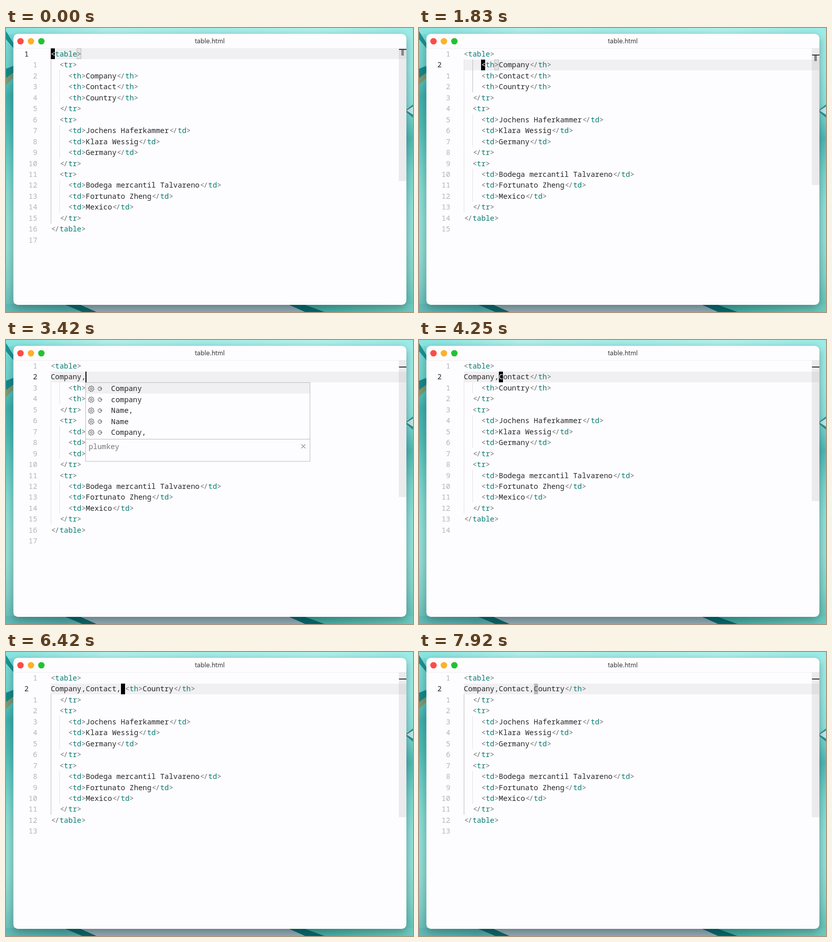
Recreate the animation shown at these times as an HTML page with a canvas. Size 800 px wide and 557 px high, loop 8000 ms.

```html
<!DOCTYPE html>
<html lang="en">
<head>
<meta charset="utf-8">
<title>table.html</title>
<style>
  html, body { margin: 0; width: 100%; height: 100%; overflow: hidden; }
  canvas { display: block; width: 800px; height: 557px; }
</style>
</head>
<body>
<canvas id="stage" width="800" height="557"></canvas>
<script>
const g = document.getElementById('stage').getContext('2d');
const LOOP = 8000, LEFT = 88, TOP = 40, CELL = 8.6, ROW = 21.48, RIGHT = 787;
const CODE = '500 14.33px "Noto Sans Mono", monospace';
const TEXT = '#262628', MARK = '#6c6e71', TAG = '#067d74', PAPER = '#fdfcfe';

const cell = (tag, text) => `    <${tag}>${text}</${tag}>`;
const record = (...values) => ['  <tr>', ...values.map(v => cell('td', v)), '  </tr>'];
const heads = ['Company', 'Contact', 'Country'].map(v => cell('th', v));
const body = [
  '  </tr>',
  ...record('Jochens Haferkammer', 'Klara Wessig', 'Germany'),
  ...record('Bodega mercantil Talvareno', 'Fortunato Zheng', 'Mexico'),
  '</table>', ''
];

// Each step: start time, lines between <table> and the rest, cursor row and column, extras
const step = (at, head, row, col, extra = {}) =>
  ({ at, lines: ['<table>', ...head, ...body], row, col, ...extra });
const [, contact, country] = heads;
const two = [contact, country];
const steps = [
  step(0, ['  <tr>', ...heads], 0, 0, { guide: 0 }),
  step(650, ['  <tr>', ...heads], 1, 0, { guide: 2 }),
  step(1400, heads, 1, 4, { guide: 2 }),
  step(2000, ['<th>Company</th>', ...two], 1, 0),
  step(2280, ['Company</th>', ...two], 1, 0),
  step(2620, ['Company</th>', ...two], 1, 7),
  step(2880, ['Company', ...two], 1, 7, { insert: true }),
  step(3080, ['Company,', ...two], 1, 8, { insert: true,
    hints: [' Company', ' company', ' Name,', ' Name', ' Company,'] }),
  step(3560, ['Company,', ...two], 1, 7),
  step(3720, ['Company, <th>Contact</th>', country], 1, 8),
  step(4020, ['Company,Contact</th>', country], 1, 8),
  step(4500, ['Company,Contact</th>', country], 1, 15),
  step(4900, ['Company,Contact', country], 1, 15, { insert: true }),
  step(5120, ['Company,Contact,', country], 1, 16, { insert: true,
    hints: ['Company', 'Contact', 'Address', 'Address,', 'Organ'] }),
  step(5780, ['Company,Contact,', country], 1, 15),
  step(6000, ['Company,Contact, <th>Country</th>'], 1, 16, { guide: 0 }),
  step(6660, ['Company,Contact,Country</th>'], 1, 16, { guide: 0 })
];

const colX = c => LEFT + c * CELL;
const rowY = r => TOP + r * ROW;
const indent = s => s.search(/\S|$/);

function rect(x, y, w, h, color) {
  g.fillStyle = color;
  g.fillRect(x, y, w, h);
}
function poly(color, ...p) {
  g.fillStyle = color;
  g.beginPath();
  for (let i = 0; i < p.length; i += 2) g.lineTo(p[i], p[i + 1]);
  g.fill();
}
function fade(x0, y0, x1, y1, ...colors) {
  const f = g.createLinearGradient(x0, y0, x1, y1);
  colors.forEach((c, i) => f.addColorStop(i / (colors.length - 1), c));
  return f;
}
function disc(x, y, r, color) {
  g.fillStyle = color;
  g.beginPath();
  g.arc(x, y, r, 0, 7);
  g.fill();
}
function write(s, x, y, color, align = 'left') {
  g.fillStyle = color;
  g.textAlign = align;
  g.fillText(s, x, y);
}
function writeCells(s, x, y, color) {
  [...s].forEach((ch, i) => write(ch, x + i * CELL, y, color));
}

function wallpaper() {
  rect(0, 0, 800, 557, fade(0, 0, 800, 0, '#86e4e0', '#b4f2ee', '#a5eeea', '#b2f3ef', '#9cece7'));
  // left edge
  rect(0, 12, 15, 545, fade(0, 12, 0, 557,
    '#7cdcd8', '#6fd3ce', '#3fb0ac', '#4fbcb6', '#6bcfc7', '#85dcd3', '#93e1d8', '#93dfd6', '#84d2cb', '#62bbb5'));
  poly('#1c9091', 0, 6, 15, 30, 15, 40, 0, 22);
  poly('#178788', 0, 80, 15, 74, 15, 88, 0, 100);
  poly('#7f9a70', 0, 98, 14, 88, 14, 98, 0, 112);
  // right edge
  rect(785, 12, 15, 545, fade(0, 12, 0, 557,
    '#a2ede8', '#a0ebe6', '#8ee2dc', '#4fb9b4', '#7bd6ce', '#92e3da', '#95e2d9', '#83d6cb', '#62bfb2'));
  poly('#2b8f90', 786, 161, 800, 150, 800, 176, 786, 164);
  poly('#c4e8e6', 787, 162, 800, 154, 800, 170);
  // bottom edge
  rect(0, 541, 800, 16, fade(0, 0, 800, 0, '#62b8b4', '#4fa9a6', '#93a9b1', '#93a9b1', '#93a9b1', '#3aa498', '#55b9ac', '#6fc9be'));
  poly('#0b6468', 112, 541, 142, 541, 180, 557, 150, 557);
  poly('#97abb3', 142, 541, 556, 541, 590, 557, 178, 557);
  poly('#07666a', 552, 541, 582, 541, 626, 557, 588, 557);
}

function windowFrame() {
  g.save();
  g.shadowColor = 'rgba(0,40,45,.4)';
  g.shadowBlur = 18;
  g.shadowOffsetY = 5;
  g.fillStyle = PAPER;
  g.beginPath();
  g.roundRect(14.5, 11.5, RIGHT - 14.5, 531.5, 9);
  g.fill();
  g.restore();
  rect(14.5, 39.5, RIGHT - 14.5, 1, '#efeef0');
  ['#fe4a45', '#fdb127', '#25c032'].forEach((c, i) => disc(28.5 + i * 20.5, 26, 6.3, c));
  g.font = '12.6px Inter, sans-serif';
  write('table.html', 400.5, 30.3, '#3a3a3c', 'center');
  g.font = CODE;
}

function guides({ lines, row, guide }) {
  const deep = (i, c) => i >= 0 && i < lines.length && indent(lines[i]) > c;
  for (const c of [0, 2]) {
    let first = -1, last = -1;
    if (c === guide) {
      first = row;
      while (!deep(first, c)) first++;
      last = first;
      while (deep(first - 1, c)) first--;
      while (deep(last + 1, c)) last++;
    }
    lines.forEach((s, i) => {
      if (!deep(i, c)) return;
      const active = i >= first && i <= last;
      rect(Math.floor(colX(c)), rowY(i), 1, ROW, active ? '#bdbdbf' : '#e2e2e4');
    });
  }
}

function codeLine(s, y) {
  let inTag = false;
  [...s].forEach((ch, i) => {
    const slash = ch === '/' && s[i - 1] === '<';
    const bracket = ch === '<' || ch === '>';
    if (ch === '<') inTag = true;
    const color = bracket || slash ? MARK : inTag ? TAG : TEXT;
    if (ch === '>') inTag = false;
    // closing tags are set tight, like a ligature
    const nudge = slash ? -0.7 : ch === '<' && s[i + 1] === '/' ? 1 : 0;
    write(ch, colX(i) + nudge, y, color);
  });
}

function gear(x, y) {
  g.beginPath();
  for (let i = 0; i <= 32; i++) {
    const a = (i + 0.5) * Math.PI / 16, r = i % 4 < 2 ? 5.7 : 4.3;
    g.lineTo(x + r * Math.cos(a), y + r * Math.sin(a));
  }
  g.moveTo(x + 1.9, y);
  g.arc(x, y, 1.9, 0, 7);
  g.stroke();
}
function snippetIcon(x, y) {
  g.beginPath();
  for (const [dx, dy] of [[4, 0], [1.8, -3.4], [-1.8, -3.4], [-3.8, 0], [-1.8, 3.4], [1.8, 3.4], [4, 0], [1.3, 0], [0, -1.6]])
    g.lineTo(x + dx, y + dy);
  g.stroke();
}

function popup(hints, x) {
  const y = 83.5, w = 441, h = 154.5;
  rect(x, y, w, h, PAPER);
  rect(x, y, w, ROW, '#f0eff1');
  g.lineWidth = 1;
  g.strokeStyle = '#bcbcbe';
  g.strokeRect(x, y, w, h);
  g.strokeRect(x, y + 111, w, 0);
  g.strokeStyle = '#4c4c4e';
  hints.forEach((s, i) => {
    const mid = y + 12 + i * ROW;
    gear(x + 11, mid);
    snippetIcon(x + 28, mid);
    writeCells(s, x + 41.5, mid + 4.6, TEXT);
  });
  writeCells('plumkey', x + 6, y + 130.5, '#77777a');
  g.beginPath();
  for (const d of [-1, 1]) {
    g.moveTo(x + 424, y + 125 - 4 * d);
    g.lineTo(x + 432, y + 125 + 4 * d);
  }
  g.stroke();
}

// Solid for half a second, then a smooth one-second blink
function blink(idle) {
  if (idle < 500) return 1;
  const p = (idle - 500) % 1000, half = p < 500 ? p : 1000 - p;
  const k = Math.min(1, Math.max(0, (half - 100) / 200));
  return 1 - k * k * (3 - 2 * k);
}

function ruler({ lines, row }, matched) {
  rect(772, TOP, RIGHT - 772, 260 + 8 * (18 - lines.length), 'rgba(90,90,95,.11)');
  const y = Math.round(TOP + 0.5 + row * 11);
  if (matched) rect(777, y + 2, 5, 11, '#858587');
  rect(772.5, y, 14.5, 2, '#3c3c3e');
}

function editor(s, idle) {
  const { lines, row, col, insert } = s, top = Math.ceil(rowY(row));
  rect(LEFT, top, RIGHT - LEFT, 21, '#f0eff1');
  guides(s);

  const match = !insert && lines[row][col] === '<' ? lines[row].indexOf('>', col) : -1;
  if (match >= 0) {
    const x = Math.floor(colX(match));
    rect(x, top, 9, 21, '#b9bdba');
    rect(x + 1, top + 1, 7, 19, '#dfe6e1');
  }
  lines.forEach((line, i) => {
    const y = rowY(i) + 15.7, here = i === row;
    const number = insert || here ? i + 1 : Math.abs(i - row);
    write(number, here && !insert ? 44.5 : 61.5, y, here ? TEXT : '#b4b4b7', 'right');
    codeLine(line, y);
  });

  g.globalAlpha = blink(idle);
  if (insert) {
    rect(colX(col) - 0.6, top, 2, 21, '#000');
  } else {
    rect(Math.round(colX(col)), top, 8, 21, '#000');
    write(lines[row][col], colX(col), rowY(row) + 15.7, '#fff');
  }
  g.globalAlpha = 1;
  ruler(s, match >= 0);
  if (s.hints && idle > 120) popup(s.hints, Math.floor(colX(col)) + 0.5);
}

function draw() {
  const t = performance.now() % LOOP;
  const now = steps.findLast(s => s.at <= t);
  wallpaper();
  windowFrame();
  editor(now, t - now.at);
  requestAnimationFrame(draw);
}
draw();
</script>
</body>
</html>
```
